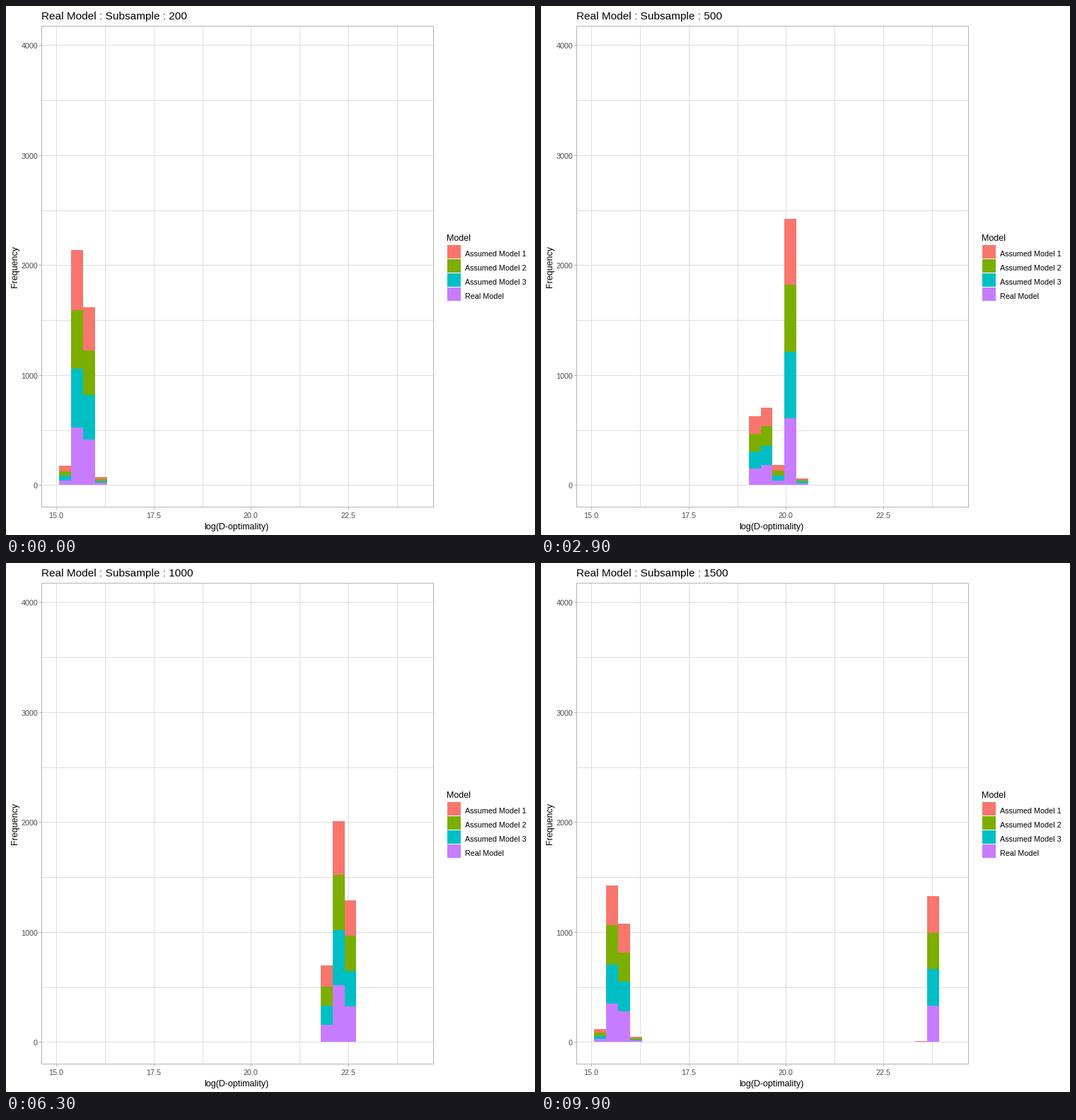
These frames come from a looping animation (748x748 px, 10000 ms). A matplotlib script:

```python
import math
import matplotlib.pyplot as plt
import numpy as np
from matplotlib.animation import FuncAnimation
from matplotlib.patches import Rectangle

SIZE, DPI = 748, 100
FRAMES, INTERVAL = 100, 100
HOLD = 4
N_BINS = 29
DRAWS = 1000
SIZES = range(200, 1501, 100)

plt.rcParams["font.family"] = "Liberation Sans"

# Bottom of the stack first: name, colour, shift of the mean.
MODELS = [
    ("Real Model", "#C77CFF", 0.006),
    ("Assumed Model 3", "#00BFC4", 0),
    ("Assumed Model 2", "#7CAE00", 0),
    ("Assumed Model 1", "#F8766D", -0.004),
]
GRID, BORDER, TICK_TEXT = "#DEDEDE", "#B3B3B3", "#4D4D4D"
LEFT, TOP, RIGHT, BOTTOM = 50, 28, 604, 708
X0, X_SCALE = 71.5, 55.08
BIN0, BIN_WIDTH = 75.45, 16.8
Y_SCALE = 0.15545


def normal_cdf(z):
    return 0.5 * (1 + math.erf(z / math.sqrt(2)))


def bin_counts(n, shift):
    """Expected histogram: the mean grows with log(n), the spread shrinks."""
    t = math.log(n / 200)
    mean = 15.653 + 4.053 * t - 0.0156 * t * t + shift
    sd = 0.16 * (n / 200) ** -0.55
    edges = [15.0744 + 0.30519 * k for k in range(N_BINS + 1)]
    return DRAWS * np.diff([normal_cdf((e - mean) / sd) for e in edges])


# Cumulative heights per subsample size: one row per model, one column per bin.
STACKS = [np.cumsum([bin_counts(n, shift) for _, _, shift in MODELS], axis=0)
          for n in SIZES]


def build_timeline():
    """(state, next state, share of the next, shown title) for every frame."""
    steps = []
    for i in range(len(SIZES)):
        j = (i + 1) % len(SIZES)
        moves = 4 if i < 3 else 3
        steps += [(i, j, 0, i)] * HOLD
        for s in range(1, moves + 1):
            shown = j if s > math.ceil(moves / 2) else i
            steps.append((i, j, s / moves, shown))
    return steps[:FRAMES]


TIMELINE = build_timeline()


def x_px(value):
    return int(X0 + X_SCALE * (value - 15))


def grid_px(count):
    return int(677.75 - Y_SCALE * count)


def bar_px(count):
    return round(677.4 - Y_SCALE * count)


def bin_px(k):
    return round(BIN0 + BIN_WIDTH * k)


fig = plt.figure(figsize=(SIZE / DPI, SIZE / DPI), dpi=DPI, facecolor="white")
ax = fig.add_axes([0, 0, 1, 1])
ax.set_xlim(0, SIZE)
ax.set_ylim(SIZE, 0)
ax.axis("off")


def box(x, y, w, h, color, z=1):
    patch = Rectangle((x, y), w, h, facecolor=color, linewidth=0,
                      antialiased=False, zorder=z)
    return ax.add_patch(patch)


def label(x, y, text, px, color="black", **kw):
    kw.setdefault("va", "baseline")
    return ax.text(x, y, text, fontsize=px * 72 / DPI, color=color, **kw)


def draw_panel():
    for i in range(8):
        value = 15 + 1.25 * i
        x = x_px(value)
        box(x, TOP, 1, BOTTOM - TOP, GRID)
        if i % 2 == 0:
            box(x, BOTTOM + 1, 1, 3, BORDER)
            label(x, 724, f"{value:.1f}", 10.8, TICK_TEXT, ha="center")
    for count in range(0, 4001, 500):
        y = grid_px(count)
        box(LEFT, y, RIGHT - LEFT, 1, GRID)
        if count % 1000 == 0:
            box(LEFT - 3, y, 3, 1, BORDER)
            label(45, y + 5, str(count), 10.8, TICK_TEXT, ha="right")
    for y in (TOP, BOTTOM):
        box(LEFT, y, RIGHT - LEFT + 1, 1, BORDER, 3)
    for x in (LEFT, RIGHT):
        box(x, TOP, 1, BOTTOM - TOP + 1, BORDER, 3)
    label(325.5, 740, "log(D-optimality)", 12.5, ha="center")
    label(13.5, 368, "Frequency", 12.5, rotation=90, ha="center", va="center")


def draw_legend():
    label(623, 332, "Model", 12.5)
    for i, (name, color, _) in enumerate(reversed(MODELS)):
        y = 338 + 20 * i
        box(624, y, 19, 19, color)
        label(649, y + 15.5, name, 10.75)


draw_panel()
draw_legend()
title = label(50, 19, "", 15.4)
bars = [[box(bin_px(k), bar_px(0), bin_px(k + 1) - bin_px(k), 0, color, 2)
         for k in range(N_BINS)] for _, color, _ in MODELS]


def update(frame):
    i, j, share, shown = TIMELINE[frame]
    tops = (1 - share) * STACKS[i] + share * STACKS[j]
    for k in range(N_BINS):
        base = bar_px(0)
        for m in range(len(MODELS)):
            top = bar_px(tops[m, k])
            bars[m][k].set_y(top)
            bars[m][k].set_height(base - top)
            base = top
    title.set_text(f"Real Model : Subsample : {SIZES[shown]}")
    return [title]


anim = FuncAnimation(fig, update, frames=FRAMES, interval=INTERVAL,
                     init_func=lambda: update(0), repeat=True, repeat_delay=0)
plt.show()
```
